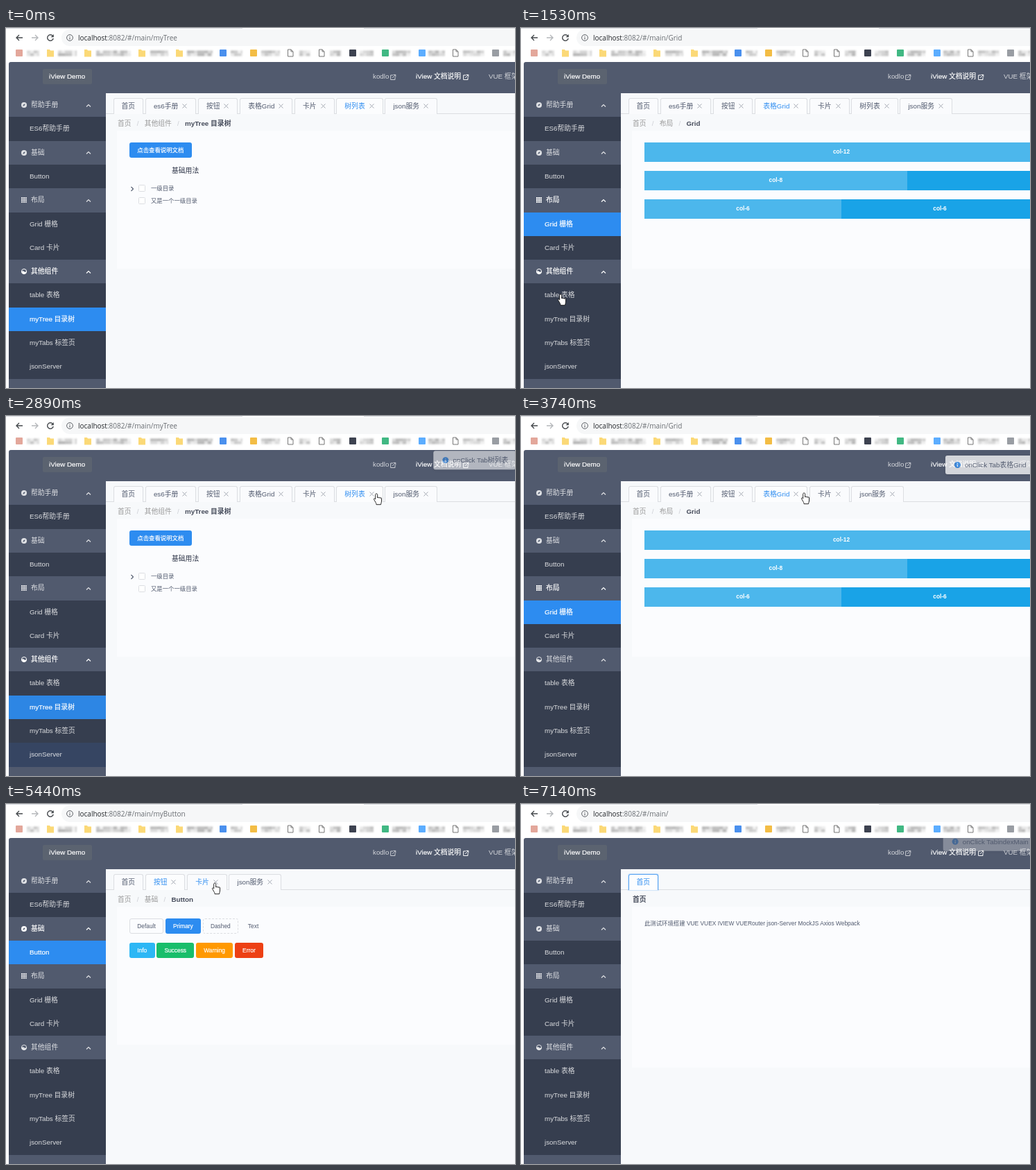
An HTML page for the animation above (7310 ms loop, 734 by 519 pixels).

```html
<!DOCTYPE html>
<html lang="zh-CN">
<head>
<meta charset="utf-8">
<title>iView Demo</title>
<style>
html, body { margin: 0; width: 100%; height: 100%; overflow: hidden; background: #fff; }
body { font: 9.8px/16px "Liberation Sans", "Noto Sans CJK SC", "Noto Sans CJK", sans-serif; color: #515a6e; }
#stage { position: relative; width: 734px; height: 519px; overflow: hidden; background: #fdfdfe; }
#stage div, #stage .t, #stage svg.i { position: absolute; }
.t, .tab, .btns, #toast { white-space: pre; }
svg { overflow: visible; }
.small { font-size: 8.4px; }
.blue { color: #2d8cf0; }
.white { color: #fff; -webkit-text-stroke: .2px #fff; }
.dim { color: rgba(255, 255, 255, .75); }
.row { left: 4px; width: 140px; height: 34.3px; line-height: 34.3px; background: #363e4f; color: rgba(255, 255, 255, .82); }
.row.group { background: #515a6e; }
.row.on { color: #fff; -webkit-text-stroke: .2px #fff; }
.row.on:not(.group) { background: #2d8cf0; }
.row.on.fresh:not(.group) { background: #2d86e4; }
.row.fade { background: #364562; }
#stage #tabs { left: 154.5px; top: 101px; height: 23px; display: flex; gap: 2.8px; }
.tab { box-sizing: border-box; height: 22.5px; padding: 0 11px; line-height: 21.5px; border: 1px solid #dcdee2; border-bottom: 0; border-radius: 3px 3px 0 0; background: #fafbfd; }
.tab svg { margin: 0 1px 0 5.9px; }
.tab.on { height: 23px; background: #fcfdfe; }
.tab.on, .tab.hover { color: #2d8cf0; }
.tab.focus { border-color: #57a3f3; box-shadow: 0 0 1px 1px rgba(45, 140, 240, .2); }
.tab.gone { display: none; }
#crumbs { left: 161px; top: 130px; white-space: nowrap; color: #999; }
#crumbs i { margin: 0 8.2px; font-style: normal; color: #ccced4; }
#panel { left: 160px; top: 148px; width: 574px; background: #fbfcfe; }
#stage .btns { left: 178px; display: flex; gap: 2.5px; }
.btns span { box-sizing: border-box; height: 22.4px; padding: 0 10.3px; border: .7px solid transparent; border-radius: 3px; font-size: 8.4px; line-height: 21px; }
.col { height: 28px; background: #19a3e7; color: #fff; font: bold 8.4px/27px "Liberation Sans", sans-serif; text-align: center; }
.col.light { background: #4cb7ec; }
.box { width: 8.4px; height: 8.4px; border: 1px solid #dcdee2; border-radius: 1.5px; background: #fff; }
.card { box-sizing: border-box; width: 245.5px; height: 134px; border: 1px solid #e8eaec; border-radius: 3px; background: #fdfdfe; }
.card hr { position: absolute; left: 0; right: 0; top: 35px; margin: 0; border: 0; border-top: 1px solid #e8eaec; }
.card p { position: absolute; left: 11px; margin: 0; line-height: 16px; white-space: nowrap; }
.card p svg { margin: 0 2.5px 0 3.5px; vertical-align: -1.2px; }
#clip { inset: 49px 0 0; overflow: hidden; }
#toast { left: 676px; top: 17px; height: 27px; padding: 0 11.5px 0 28px; line-height: 27px; border-radius: 3px; background: #fff; box-shadow: 0 1px 4px rgba(0, 0, 0, .15); }
#toast svg { position: absolute; left: 12.5px; top: 9px; }
</style>
</head>
<body>
<div id="stage"></div>
<script>
const STEP = 170, LOOP = 7310;
const stage = document.getElementById('stage');

function add(parent, cls, html = '', css = '', tag = 'div') {
  const el = document.createElement(tag);
  el.className = cls;
  el.innerHTML = html;
  el.style.cssText = css;
  parent.append(el);
  return el;
}
const rect = (p, x, y, w, h, color, more = '') =>
  add(p, '', '', `left:${x}px;top:${y}px;width:${w}px;height:${h}px;background:${color};${more}`);
// text by its left edge and vertical centre
const text = (p, x, y, s, cls = '', css = '') =>
  add(p, 't ' + cls, s, `left:${x}px;top:${y - 8}px;${css}`, 'span');
const svg = (w, h, body, attrs = '') => `<svg width="${w}" height="${h}" ${attrs}>${body}</svg>`;
const line = (d, color = 'currentColor', w = 1) =>
  `<path d="${d}" fill="none" stroke="${color}" stroke-width="${w}"/>`;
const icon = (p, x, y, body, color = '#515a6e') =>
  p.insertAdjacentHTML('beforeend', svg(1, 1, body, `class="i" style="left:${x}px;top:${y}px;color:${color}"`));

// browser bar
rect(stage, 0, 0, 734, 49, '#fff');
rect(stage, 0, 0, 341, 1, '#d8dbe0');
rect(stage, 516, 0, 218, 1, '#d8dbe0');
rect(stage, 80, 2, 680, 24, '#f6f7f8', 'border-radius:12px');
icon(stage, 19, 14, line('M5 0H-4M0-4L-4 0L0 4', '#45494d', 1.4));
icon(stage, 42, 14, line('M-5 0H4M0-4L4 0L0 4', '#b5b8bb', 1.4));
icon(stage, 64, 14, line('M3.4-2.6A4.3 4.3 0 1 0 4.2 1', '#45494d', 1.4) + '<path d="M4.8-5V-.8H.6z" fill="#45494d"/>');
icon(stage, 92, 14, '<circle r="4.4" fill="none" stroke="#5f6368"/>' + line('M0-.6V2.4M0-2.6V-1.4', '#5f6368', 1.1));
const url = text(stage, 104, 14, '', '', 'font-family:"Open Sans",sans-serif;font-size:10px;color:#6a6e73');

// bookmarks: kind, icon x, label start, label end
const noise = n => { const s = Math.sin(n * 12.9898) * 43758.5453; return s - Math.floor(s); };
const marks = [
  ['#e3a79b', 19, 30, 48], ['dir', 64, 75, 102], ['dir', 118, 130, 180], ['dir', 196, 208, 234],
  ['dir', 250, 261, 298], ['#4a90ee', 313, 324, 341], ['#f3bd45', 357, 368, 395], ['doc', 410, 423, 439],
  ['doc', 455, 467, 484], ['#3d4250', 500, 510, 530], ['#41b883', 547, 557, 583], ['#5cadff', 600, 609, 633],
  ['doc', 648, 659, 690], ['#999da3', 706, 717, 734]];
for (const [kind, x, from, to] of marks) {
  if (kind === 'dir') icon(stage, x, 36, '<path d="M-5-5H-1L0-3.5H5V5.5H-5z" fill="#fbd977"/>');
  else if (kind === 'doc') icon(stage, x, 36, line('M-3.5-5H1L4-2V5H-3.5zM1-5V-2H4', '#777'));
  else rect(stage, x - 5, 31, 10, 10, kind, 'border-radius:1px');
  let blocks = '';
  for (let i = from; i < to; i += 5)
    for (const y of [32.5, 36.5]) {
      const g = 180 + Math.round(noise(i + y) * 60);
      blocks += `<rect x="${i - from}" y="${y - 36}" width="${Math.min(5, to - i)}" height="4" fill="rgb(${g},${g},${g})"/>`;
    }
  icon(stage, from, 36, `<g style="filter:blur(.9px)">${blocks}</g>`);
}

// header
rect(stage, 4, 49, 730, 45, '#515a6e', 'border-radius:3px 0 0 0');
rect(stage, 4, 94, 140, 425, '#515a6e');
rect(stage, 144, 94, 590, 425, '#f7f9fb');
rect(stage, 53, 59, 71, 22, '#5b6370', 'border-radius:2px');
text(stage, 62, 70, 'iView Demo', 'white');
const link = line('M0-3H-3.3V3.5H3V0M.5-3.6H3.8V-.3M3.6-3.4L-.8 1');
text(stage, 529, 70, 'kodlo', 'dim');
icon(stage, 558, 70.5, link, '#cbced4');
text(stage, 591, 70, 'iView 文档说明', 'white');
icon(stage, 663, 70.5, link, '#fff');
text(stage, 696, 70, 'VUE 框架', 'dim');

// side menu
const disc = '<circle r="4" fill="currentColor"/><path d="M-1.8 1.8L-.7-.7L1.8-1.8L.7.7z" fill="#515a6e"/>';
let cells = '';
for (let i = 0; i < 9; i++)
  cells += `<rect x="${i % 3 * 2.8 - 4}" y="${Math.floor(i / 3) * 2.8 - 4}" width="2.2" height="2.2" fill="currentColor"/>`;
const half = '<circle r="3.6" fill="none" stroke="currentColor"/><path d="M-3.6 0Q-1-1.5 0 0T3.6 0A3.6 3.6 0 0 1-3.6 0" fill="currentColor"/>';
const menu = [['帮助手册', disc], ['ES6帮助手册'], ['基础', disc], ['Button'], ['布局', cells], ['Grid 栅格'],
  ['Card 卡片'], ['其他组件', half], ['table 表格'], ['myTree 目录树'], ['myTabs 标签页'], ['jsonServer']];
const groupOf = [0, 0, 2, 2, 4, 4, 4, 7, 7, 7, 7, 7];
const rows = menu.map(([name, pic], i) => {
  const row = add(stage, pic ? 'row group' : 'row', '', `top:${94 + i * 34.3}px`);
  add(row, 't', name, `left:${pic ? 32 : 30}px`, 'span');
  if (pic) {
    icon(row, 22, 17.3, pic, 'inherit');
    icon(row, 115, 17.5, line('M-3 1.5L0-1.5L3 1.5', 'currentColor', 1.2), 'inherit');
  }
  return row;
});

// tabs and breadcrumb
rect(stage, 144, 123, 590, 1, '#dcdee2');
const tabBar = add(stage, '');
tabBar.id = 'tabs';
const cross = svg(7, 7, line('M.5 .5L6.5 6.5M6.5 .5L.5 6.5', '#a3a8b2'));
// name, page, step at which it closes
const tabs = [['首页', 'main', 99], ['es6手册', '', 28], ['按钮', 'button', 37], ['表格Grid', 'grid', 24],
  ['卡片', 'card', 33], ['树列表', 'tree', 19], ['json服务', 'json', 35]]
  .map(([name, page, end]) => ({ page, end, el: add(tabBar, 'tab', name + (page === 'main' ? '' : cross), '', 'span') }));
const crumbs = add(stage, '');
crumbs.id = 'crumbs';
const panel = add(stage, '');
panel.id = 'panel';

// pages: address, breadcrumb, menu row, panel height
const pages = {
  main: { path: '', trail: [], height: 232 },
  button: { path: 'myButton', trail: ['基础', 'Button'], row: 3 },
  grid: { path: 'Grid', trail: ['布局', 'Grid'], row: 5 },
  card: { path: 'Card', trail: ['布局', 'Card'], row: 6, height: 371 },
  tree: { path: 'myTree', trail: ['其他组件', 'myTree 目录树'], row: 9 },
  json: { path: 'jsonServer', trail: ['其他组件', 'jsonServer'], row: 11 }
};
for (const p of Object.values(pages)) p.el = add(stage, '');

text(pages.main.el, 178, 171.5, '此测试环境搭建 VUE VUEX IVIEW VUERouter json-Server MockJS Axios Webpack', 'small');

function buttons(p, y, list) {
  const box = add(p, 'btns', '', `top:${y}px`);
  for (const [name, bg, border] of list)
    add(box, bg ? 'white' : '', name, `background:${bg || 'none'};border:.7px ${border || 'solid transparent'}`, 'span');
}
buttons(pages.button.el, 165, [['Default', '', 'solid #dcdee2'], ['Primary', '#2d8cf0'], ['Dashed', '', 'dashed #dcdee2'], ['Text']]);
buttons(pages.button.el, 200, [['Info', '#2db7f5'], ['Success', '#19be6b'], ['Warning', '#ff9900'], ['Error', '#ed4014']]);

const col = (x, y, w, s, light) =>
  add(pages.grid.el, light ? 'col light' : 'col', s, `left:${x}px;top:${y}px;width:${w}px`);
col(178, 165, 568, 'col-12', true);
col(178, 206, 378.6, 'col-8', true);
col(556.6, 206, 189.4, '');
col(178, 246.5, 284, 'col-6', true);
col(462, 246.5, 284, 'col-6');

buttons(pages.tree.el, 165, [['点击查看说明文档', '#2d8cf0']]);
text(pages.tree.el, 239, 206, '基础用法', '', 'color:#2b3245');
icon(pages.tree.el, 182, 231.5, line('M-1.5-3L1.5 0L-1.5 3', '#515a6e', 1.1));
['一级目录', '又是一个一级目录'].forEach((s, i) => {
  add(pages.tree.el, 'box', '', `left:191px;top:${226 + i * 18}px`);
  text(pages.tree.el, 209, 231 + i * 18, s, 'small');
});

const films = [['Lanterns over My Orchard', 9.5], ['Mirrored Isle', 9.2], ['The Tailor of 1730', 9.2],
  ['The Wrenmoor Inheritance', 9.6], ['Rain Is Plentiful', 9.5], ['Refluence', 9.2], ['TOBB·O', 9.3],
  ['Mara:The Cartographer', 9.4], ['Harlan Quibb', 9.4], ["Brenneck's Map", 9.5]];
const star = 'M4.5 .3L5.7 3.3L8.9 3.5L6.4 5.5L7.3 8.7L4.5 6.9L1.7 8.7L2.6 5.5L.1 3.5L3.3 3.3z';
const halfStar = 'M4.5 .3V6.9L1.7 8.7L2.6 5.5L.1 3.5L3.3 3.3z';
function stars(score) {
  let s = '';
  for (let i = 0; i < 5; i++) {
    const cut = i === 4 && score < 9.5;
    s += `<g transform="translate(${i * 9.7 + .6} .6) scale(.88)"><path d="${cut ? halfStar : star}" fill="#515a6e"/>` +
      (cut ? line(star, '#515a6e', .35) : '') + '</g>';
  }
  return svg(48.5, 9, s);
}
const reel = '<rect x="-3.7" y="-3.2" width="7.4" height="6.4" fill="none" stroke="currentColor" stroke-width=".8"/>' +
  line('M-2-3V3M2-3V3M-2 0H2', 'currentColor', .6);
['01234', '25640', '37958', '74520', '58073', '81240', '80', '75', '06'].forEach((list, i) => {
  const card = add(pages.card.el, 'card', '<hr>', `left:${177.5 + i % 3 * 252}px;top:${165.5 + Math.floor(i / 3) * 140}px`);
  icon(card, 15.5, 17, reel, '#747b8b');
  text(card, 23.5, 16.5, 'Classic film', '', 'font-weight:bold;color:#17233d');
  text(card, 197.5, 16.5, 'Change', 'blue');
  [...list].forEach((f, k) => {
    const [name, score] = films[f];
    add(card, '', `<span class="blue">${name}</span>${stars(score)}${score}`, `top:${46 + k * 14.8}px`, 'p');
  });
});

// message and pointer
const clip = add(stage, '');
clip.id = 'clip';
const toast = add(clip, '');
toast.id = 'toast';
const info = svg(9, 9, '<circle cx="4.5" cy="4.5" r="4.5" fill="#2d8cf0"/>' + line('M4.5 4V7M4.5 2V3.1', '#fff', 1.1));
const hand = add(stage, '', svg(13, 18,
  '<path d="M4.2 1C3.2 1 2.7 1.7 2.7 2.5V9L1.8 8.2C1 7.6 0 8.3 .6 9.4L3 13.5C3.5 14.4 4 15 4 16.7H10.5C10.5 15 11.5 14 11.5 12V7.8C11.5 6.6 9.9 6.5 9.6 7.5C9.6 6.2 7.8 6 7.6 7.2C7.5 6.1 5.9 6 5.7 7V2.5C5.7 1.7 5.2 1 4.2 1z" fill="#fff" stroke="#111" stroke-width=".9"/>'));

// step, page
const visits = [[0, 'tree'], [3, 'button'], [6, 'grid'], [11, 'tree'], [14, 'json'], [17, 'tree'], [19, 'json'],
  [21, 'grid'], [24, 'card'], [28, 'button'], [33, 'json'], [35, 'button'], [37, 'main']];
// step, x, y
const route = [[1, 70, 150], [3, 55, 214], [4, 55, 214], [6, 52, 276], [7, 52, 280], [9, 57, 384], [11, 57, 417],
  [12, 57, 417], [14, 57, 486], [15, 57, 486], [17, 534, 112], [18, 526, 112], [21, 400, 110], [22, 408, 111],
  [23, 397, 112], [25, 298, 112], [27, 258, 112], [28, 258, 112], [30, 300, 114], [32, 301, 114], [33, 303, 112],
  [34, 320, 112], [36, 242, 112], [38, 176, 112], [40, 176, 112]];
// first step, last step, label, visibility on both
const toasts = [[17, 21, '树列表', .56, .4], [22, 28, '表格Grid', .75, .4], [38, 42, 'indexMain', .6, .3]];

const pageAt = n => visits.filter(v => v[0] <= n).pop()[1];
function pointerAt(n) {
  const i = route.findIndex(k => k[0] >= n);
  if (i < 0 || n < route[0][0]) return null;
  const b = route[i], a = route[i - 1] || b;
  const f = b === a ? 1 : (n - a[0]) / (b[0] - a[0]);
  return [a[1] + (b[1] - a[1]) * f, a[2] + (b[2] - a[2]) * f];
}

function draw(n) {
  const name = pageAt(n), page = pages[name], before = pages[pageAt(Math.max(0, n - 1))];
  const tip = pointerAt(n);
  for (const p of Object.values(pages)) p.el.style.display = p === page ? '' : 'none';
  url.innerHTML = `<span style="color:#24272b">localhost</span>:8082/#/main/${page.path}`;
  const trail = ['首页', ...page.trail], last = trail.pop();
  crumbs.innerHTML = trail.map(s => s + '<i>/</i>').join('') + `<b style="color:#464c5b">${last}</b>`;
  panel.style.height = (page.height || 199) + 'px';

  const over = tip && tip[0] < 144 ? Math.floor((tip[1] - 94) / 34.3) : -1;
  rows.forEach((row, i) => {
    const group = i === groupOf[i];
    row.classList.toggle('on', group ? i === groupOf[page.row] || i === groupOf[over] : i === page.row);
    row.classList.toggle('fresh', before !== page);
    row.classList.toggle('fade', before !== page && i === before.row);
  });

  for (const t of tabs) t.el.classList.toggle('gone', n >= t.end);
  for (const t of tabs) {
    const x = tip ? tip[0] - tabBar.offsetLeft - t.el.offsetLeft : -1;
    t.el.classList.toggle('on', t.page === name);
    t.el.classList.toggle('hover', x >= 0 && x < t.el.offsetWidth && tip[1] > 101 && tip[1] < 124);
    t.el.classList.toggle('focus', t.page === 'main' && n >= 38);
  }

  const msg = toasts.find(m => n >= m[0] && n <= m[1]);
  toast.style.display = msg ? '' : 'none';
  if (msg) {
    const show = n === msg[0] ? msg[3] : n === msg[1] ? msg[4] : 1;
    toast.innerHTML = info + 'onClick Tab' + msg[2];
    toast.style.opacity = show;
    toast.style.transform = `translate(-50%, ${(show - 1) * 36}px)`;
  }

  hand.style.display = tip ? '' : 'none';
  if (tip) hand.style.transform = `translate(${tip[0] - 4}px, ${tip[1] - 1}px)`;
}

let shown = -1;
function tick() {
  const n = Math.floor(performance.now() % LOOP / STEP);
  if (n !== shown) draw(shown = n);
  requestAnimationFrame(tick);
}
tick();
</script>
</body>
</html>
```
